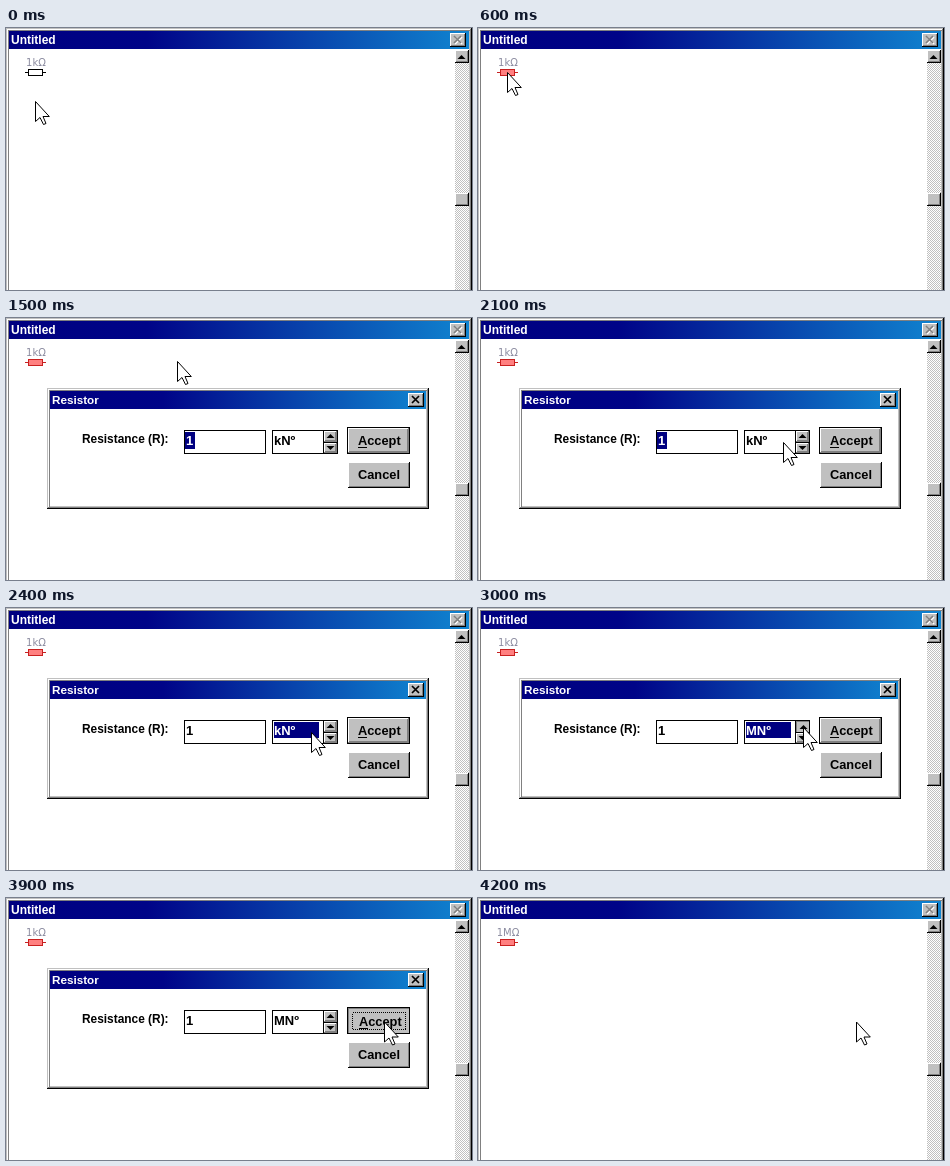
Recreate the animation shown at these times as an HTML page. Size 466 by 262 pixels, loop 5.2 s.

```html
<!DOCTYPE html>
<html lang="en">
<head>
<meta charset="utf-8">
<title>Resistor dialog</title>
<style>
html, body { margin: 0; width: 100%; height: 100%; overflow: hidden; background: #fff; }
svg { display: block; width: 466px; height: 262px; shape-rendering: crispEdges; }
text { font-family: "Liberation Sans", Arial, sans-serif; font-weight: bold; white-space: pre; }
</style>
</head>
<body>
<svg id="stage" viewBox="0 0 466 262" xmlns="http://www.w3.org/2000/svg"></svg>
<script>
const NAVY = '#000080', FACE = '#c0c0c0', SHADE = '#808080';
const LOOP = 5200, STEP = 300;

const box = (x, y, w, h, fill) =>
  `<rect x="${x}" y="${y}" width="${w}" height="${h}" fill="${fill}"/>`;
const label = (x, y, str, size, fill = '#000', more = '') =>
  `<text x="${x}" y="${y}" font-size="${size}" fill="${fill}" ${more}>${str}</text>`;
const group = (id, body) => `<g id="${id}">${body}</g>`;

// Raised panel: light top-left edges, dark bottom-right edges
const bevel = (x, y, w, h, dark = '#000') =>
  box(x, y, w, h, dark) + box(x, y, w - 1, h - 1, '#fff') +
  box(x + 1, y + 1, w - 2, h - 2, SHADE) + box(x + 1, y + 1, w - 3, h - 3, FACE);

// Window border with a title gradient; the client area is white
const frame = (x, y, w, h, title, size) =>
  box(x, y, w, h, '#000') + box(x, y, w - 1, h - 1, FACE) +
  box(x + 1, y + 1, w - 2, h - 2, SHADE) + box(x + 1, y + 1, w - 3, h - 3, '#fff') +
  box(x + 2, y + 2, w - 4, h - 4, SHADE) + box(x + 3, y + 3, w - 5, h - 5, FACE) +
  box(x + 3, y + 3, w - 6, h - 6, '#fff') +
  box(x + 3, y + 3, w - 6, 18, 'url(#bar)') +
  label(x + 5, y + 16, title, size, '#fff');

const cross = (x, y, color) =>
  `<path d="M${x} ${y}l7 7m0-7l-7 7" stroke="${color}" stroke-width="1.7" fill="none" shape-rendering="auto"/>`;
const triangle = (x, y, dir) =>
  `<path d="M${x} ${y}l4 ${4 * dir}h-8z" shape-rendering="auto"/>`;
const field = (x, w) => box(x, 112, w, 24, '#000') + box(x + 1, 113, w - 2, 22, '#fff');

const resistor =
  `<g id="part" fill="#fff" stroke="#000">
    <path d="M19 44.5h21"/><rect x="22.5" y="41.5" width="14" height="6"/>
  </g>
  <text id="value" x="30" y="38" text-anchor="middle" fill="#8c8ca0"
    style="font:10px 'DejaVu Sans', sans-serif"></text>`;

const windowArt =
  frame(0, 0, 466, 300, 'Untitled', 12) +
  bevel(444, 5, 16, 14) + cross(449, 9, '#fff') + cross(448, 8, SHADE) +
  box(449, 22, 14, 240, 'url(#check)') +
  bevel(449, 22, 14, 13) + triangle(455.5, 27, 1) +
  bevel(449, 165, 14, 13) + resistor;

const acceptText = label(352, 127, 'Accept', 12.8) + box(352, 129, 9, 1, '#000');
const dialogArt =
  frame(41, 70, 382, 121, 'Resistor', 11.7) +
  bevel(402, 75, 16, 14) + cross(406, 78, '#000') +
  label(76, 125, 'Resistance (R):', 11.9) +
  field(178, 82) + group('amountMark', box(179, 114, 10, 17, NAVY)) +
  label(180, 127, '1', 13, '#000', 'id="amount"') +
  field(266, 66) + group('unitMark', box(268, 114, 45, 16, NAVY)) +
  label(268, 127, '', 13, '#000', 'id="unit"') +
  box(317, 112, 15, 24, '#000') +
  bevel(318, 113, 13, 11, SHADE) + bevel(318, 125, 13, 10, SHADE) +
  group('upDown', box(318, 113, 13, 11, SHADE) + box(319, 114, 12, 10, FACE)) +
  group('upArrow', triangle(324.5, 116, 1)) + triangle(324.5, 132, -1) +
  box(341, 109, 63, 27, '#000') + bevel(342, 110, 61, 25, SHADE) +
  group('acceptDown', box(342, 110, 61, 25, SHADE) + box(343, 111, 60, 24, FACE) +
    '<rect x="346.5" y="114.5" width="53" height="17" fill="none" stroke="#000" stroke-dasharray="1 1"/>') +
  group('accept', acceptText) +
  bevel(342, 144, 62, 26) + label(352, 161, 'Cancel', 12.8);

const stage = document.getElementById('stage');
stage.innerHTML =
  `<defs>
    <linearGradient id="bar"><stop stop-color="${NAVY}"/><stop offset=".3" stop-color="#000488"/>
      <stop offset="1" stop-color="#1084d0"/></linearGradient>
    <pattern id="check" width="2" height="2" patternUnits="userSpaceOnUse">
      ${box(0, 0, 2, 2, '#fff') + box(0, 0, 1, 1, FACE) + box(1, 1, 1, 1, FACE)}
    </pattern>
  </defs>` +
  windowArt + group('dialog', dialogArt) +
  `<path id="cursor" d="M.5 .5V20.5L5 16.5L8.5 23.5L11 22.5L8 15.5H14.3Z"
    fill="#fff" stroke="#000" shape-rendering="auto"/>`;

const $ = id => document.getElementById(id);
const show = (id, on) => $(id).setAttribute('display', on ? 'inline' : 'none');
const move = (id, x, y) => $(id).setAttribute('transform', `translate(${x} ${y})`);

// [first step, x, y]: the pointer jumps between these spots
const spots = [
  [0, 29, 73], [1, 29, 44], [4, 104, 41], [5, 171, 43], [6, 259, 83],
  [7, 305, 124], [9, 325, 119], [12, 378, 123.5]
];

function draw(ms) {
  const step = Math.min(14, Math.floor((ms % LOOP) / STEP));
  const [, x, y] = spots.filter(s => s[0] <= step).pop();
  move('cursor', x, y);

  const picked = step >= 2;
  $('part').setAttribute('fill', picked ? '#ff8080' : '#fff');
  $('part').setAttribute('stroke', picked ? '#c82020' : '#000');
  $('value').textContent = step < 14 ? '1kΩ' : '1MΩ';

  show('dialog', step >= 3 && step < 14);
  const amountOn = step < 8, unitOn = step >= 8 && step < 13;
  show('amountMark', amountOn);
  $('amount').setAttribute('fill', amountOn ? '#fff' : '#000');
  show('unitMark', unitOn);
  $('unit').setAttribute('fill', unitOn ? '#fff' : '#000');
  $('unit').textContent = step < 10 ? 'kNº' : 'MNº';

  const upPressed = step === 10, acceptPressed = step === 13;
  show('upDown', upPressed);
  move('upArrow', +upPressed, +upPressed);
  show('acceptDown', acceptPressed);
  move('accept', +acceptPressed, +acceptPressed);
}

const start = performance.now();
function tick() {
  draw(performance.now() - start);
  requestAnimationFrame(tick);
}
tick();
</script>
</body>
</html>
```
